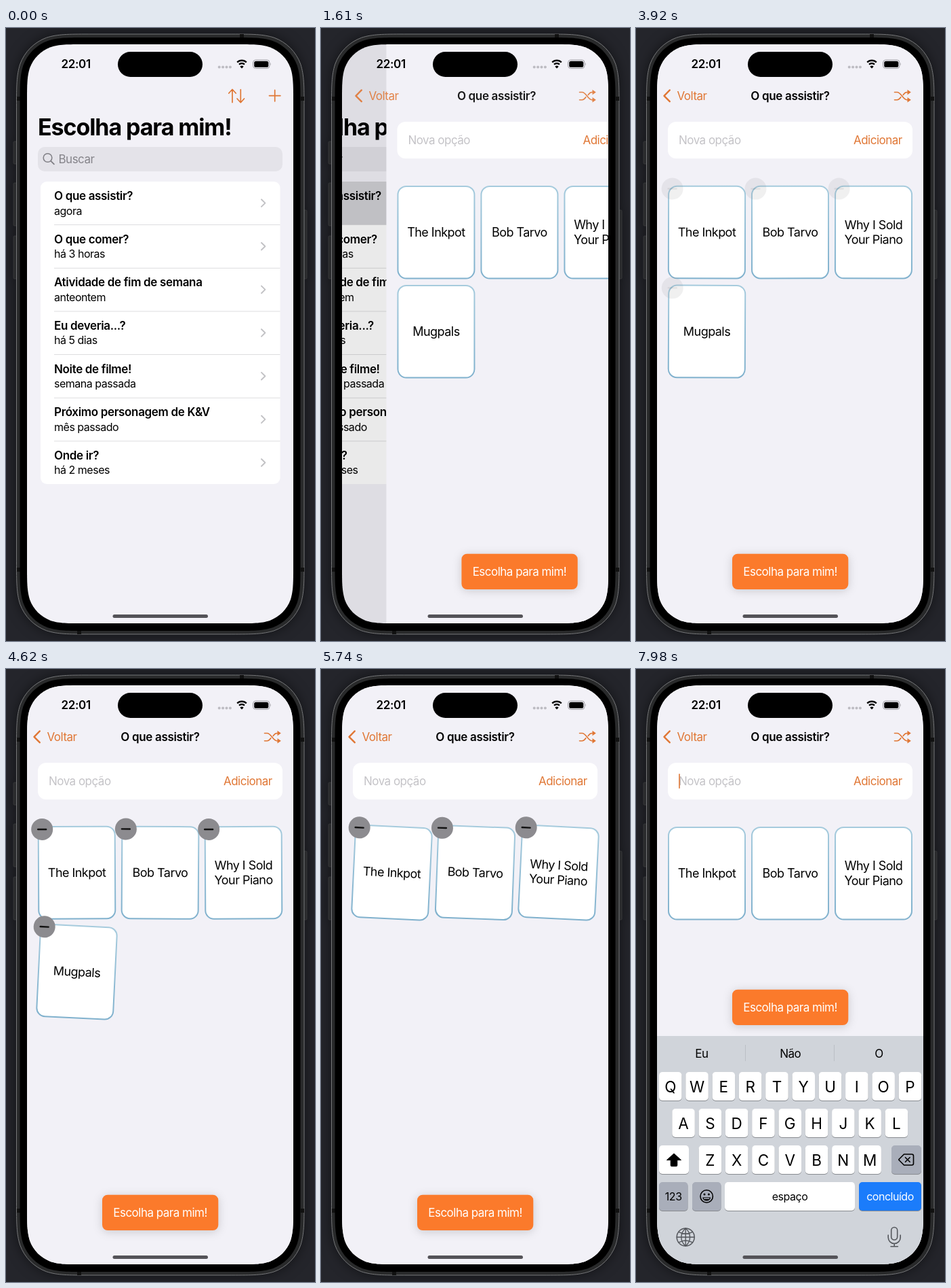
Recreate the animation shown at these times as an HTML page. Size 456 by 902 pixels, loop 8000 ms.

```html
<!DOCTYPE html>
<html lang="pt">
<head>
<meta charset="utf-8">
<title>Escolha para mim!</title>
<style>
html, body { margin: 0; width: 100%; height: 100%; overflow: hidden; background: #24252b; }
svg { display: block; width: 456px; height: 902px; }
text { font-family: Inter, "Liberation Sans", sans-serif; font-size: 17px; letter-spacing: -.03em; }
.semi { font-weight: 600; letter-spacing: -.02em; }
.sub { font-size: 16px; }
.big { font-size: 34px; font-weight: 700; letter-spacing: -.032em; }
.opt { font-size: 18px; }
.key { font-size: 22.5px; letter-spacing: 0; }
.mid { text-anchor: middle; }
.line { fill: none; stroke-linecap: round; stroke-linejoin: round; }
.tint { stroke: #e07735; }
.tinted { fill: #e07735; }
#pick { filter: drop-shadow(0 2px 7px rgba(0,0,0,.16)); }
#body { filter: drop-shadow(0 0 9px rgba(0,0,0,.5)); }
</style>
</head>
<body>
<svg viewBox="0 0 456 902">
  <defs>
    <clipPath id="screen"></clipPath>
    <linearGradient id="edge" x1="0" y1="0" x2="0" y2="1">
      <stop offset="0" stop-color="#a6cbdd"/><stop offset="1" stop-color="#80b1cd"/>
    </linearGradient>
  </defs>
  <rect width="456" height="902" fill="#24252b"/>
  <g id="body"></g>
  <g clip-path="url(#screen)">
    <rect x="31" y="24" width="393" height="852" fill="#f2f1f7"/>
    <g id="list"></g>
    <rect id="dim" x="31" y="24" width="393" height="852" opacity="0"/>
    <g id="detail"></g>
    <g id="listNav"></g>
    <g id="detailNav"></g>
    <g id="keyboard"></g>
    <g id="status"></g>
  </g>
</svg>
<script>
const LOOP = 8000, STEP = 70, TINT = '#e07735';
const $ = id => document.getElementById(id);
const fill = (id, ...parts) => { $(id).innerHTML = parts.flat().join(''); };
const text = (x, y, str, cls = '', color = '#000') =>
  `<text x="${x}" y="${y}" class="${cls}" fill="${color}">${str.replace('&', '&amp;')}</text>`;
const rect = (x, y, w, h, r, color, extra = '') =>
  `<rect x="${x}" y="${y}" width="${w}" height="${h}" rx="${r}" fill="${color}" ${extra}/>`;
const line = (d, w, color = '', extra = '') =>
  `<path d="${d}" class="line ${color ? '' : 'tint'}" stroke-width="${w}" ${color && `stroke="${color}"`} ${extra}/>`;
const ring = (x, y, r, w, color) =>
  `<circle cx="${x}" cy="${y}" r="${r}" fill="none" stroke="${color}" stroke-width="${w}"/>`;

// Rectangle whose corners bend gradually, mirrored into all four corners
const BEND = [[0, 1.53], [0, 1.09], [0, .868], [.075, .631], [.169, .373],
  [.373, .169], [.631, .075], [.868, 0], [1.09, 0], [1.53, 0]];
function smoothRect(x, y, w, h, r, color, extra = '') {
  const corner = (right, bottom) => {
    const pts = BEND.map(([a, b]) => [right ? x + w - a * r : x + a * r, bottom ? y + h - b * r : y + b * r]);
    const [first, ...rest] = right === bottom ? pts : pts.reverse();
    return `${first} C${rest.join(' ')}`;
  };
  const d = 'M' + [corner(0, 0), corner(1, 0), corner(1, 1), corner(0, 1)].join(' L') + 'Z';
  return `<path d="${d}" fill="${color}" ${extra}/>`;
}

// Phone shell
const sideButton = (x, y, h) => rect(x, y, 6, h, 1.5, '#292a2c', 'stroke="#3d3e41" stroke-width=".8"');
fill('screen', smoothRect(31, 24, 393, 852, 55, '#000'));
fill('body',
  sideButton(11, 167, 33), sideButton(11, 228, 63), sideButton(11, 306, 63), sideButton(438, 268, 101),
  smoothRect(15.5, 9, 424.5, 883, 70, '#292a2b', 'stroke="#77787a" stroke-width="1"'),
  rect(16, 101, 5, 6, 0, '#111'), rect(435, 101, 5, 6, 0, '#111'),
  rect(16, 794, 5, 6, 0, '#111'), rect(435, 794, 5, 6, 0, '#111'),
  rect(345, 9, 6, 5, 0, '#111'), rect(105, 887, 6, 5, 0, '#111'),
  smoothRect(20.5, 14, 414, 873, 65, '#000'));

// Status bar, island and home bar
fill('status',
  text(81.5, 59, '22:01', 'semi'),
  rect(165, 35, 125, 37, 18.5, '#000'),
  [0, 1, 2, 3].map(i => `<circle cx="${314.7 + i * 5.4}" cy="57.5" r="2" fill="#bdbcc2"/>`),
  line('M341.2 50.5a9.6 9.6 0 0 1 13.6 0M344 53.7a5.7 5.7 0 0 1 8 0', 2.4, '#000', 'style="stroke-linecap:butt"'),
  '<path d="M348 59.6l-2.7-2.9a3.9 3.9 0 0 1 5.4 0z"/>',
  rect(364.5, 47, 24.5, 12.5, 4, 'none', 'stroke="#9f9ea4"'),
  rect(366.2, 48.7, 21.1, 9.1, 2.6, '#000'),
  '<path d="M390.4 51.2q1.7 2-.1 4z" fill="#9f9ea4"/>',
  rect(157.5, 863, 140.5, 5, 2.5, '#545358'));

// List page
const ROWS = [
  ['O que assistir?', 'agora'], ['O que comer?', 'há 3 horas'],
  ['Atividade de fim de semana', 'anteontem'], ['Eu deveria...?', 'há 5 dias'],
  ['Noite de filme!', 'semana passada'], ['Próximo personagem de K&V', 'mês passado'],
  ['Onde ir?', 'há 2 meses']
];
const ROW = 63.65;
fill('list',
  text(47, 158, 'Escolha para mim!', 'big'),
  rect(47, 175, 361, 36, 10, '#e4e3e9'),
  ring(61.5, 191, 6.3, 1.6, '#818086'), line('M66.3 195.8l4.6 4.6', 1.8, '#818086'),
  text(77.5, 199, 'Buscar', '', '#85848a'),
  rect(51, 226, 353.5, 445, 9, '#fff'),
  '<path id="tap" d="M51 289.5V235q0-9 9-9h335.5q9 0 9 9v54.5z" fill="#d1d1d6" opacity="0"/>',
  ROWS.map(([title, when], i) => {
    const y = 226 + i * ROW;
    return text(71, y + 27, title, 'semi') + text(71, y + 48.5, when, 'sub') +
      line(`M377 ${y + 26.3}l5.4 5.3l-5.4 5.3`, 1.9, '#c2c2c5') +
      (i ? rect(71, y - .4, 333.5, .8, 0, '#d5d5d8') : '');
  }));
fill('listNav',
  line('M334 109.5V90.5M328.8 96l5.2-5.7l5.2 5.7M346.3 90.5v19M341.1 104l5.2 5.7l5.2-5.7', 1.7),
  line('M388.5 99.6h16.4M396.7 91.4v16.4', 1.7));

// Detail page
const CARDS = [
  { x: 104.5, y: 300.7, label: ['The Inkpot'], phase: -.02 },
  { x: 227.5, y: 300.7, label: ['Bob Tarvo'], phase: .15 },
  { x: 350.5, y: 300.7, label: ['Why I Sold', 'Your Piano'], phase: 0 },
  { x: 104.5, y: 446.7, label: ['Mugpals'], phase: .5 }
];
fill('detail',
  rect(31, 24, 393, 852, 0, '#f2f1f7'),
  rect(47, 138, 361, 54, 12, '#fff'),
  text(63, 171, 'Nova opção', '', '#c4c3c7'),
  text(321, 171, 'Adicionar', '', TINT),
  rect(63, 154, 2, 22, 1, TINT, 'id="caret"'),
  CARDS.map(({ label }) => '<g class="card">' +
    rect(-56.5, -67.8, 113, 135.6, 12.5, '#fff', 'stroke="url(#edge)" stroke-width="2"') +
    label.map((s, i) => text(0, 6.2 + (i * 2 - label.length + 1) * 10.8, s, 'opt mid')).join('') +
    '<g class="badge" transform="translate(-51 -64)"><circle r="16" fill="#8c8b8f"/>' +
    line('M-6 0H6', 2.4, '#111') + '</g></g>'),
  '<g id="pick">', rect(142, 773.7, 171.3, 52.3, 8, '#fb7a2b'),
  text(227.5, 806, 'Escolha para mim!', 'mid', '#fff'), '</g>');
fill('detailNav',
  '<g id="goBack">', line('M49.8 91.4l-8.3 8.4l8.3 8.4', 2.4),
  text(60.5, 106, 'Voltar', '', TINT), '</g>',
  `<g id="title">${text(227.5, 106, 'O que assistir?', 'semi mid')}</g>`,
  line('M381.5 94.5h3.8c6 0 8.5 11.2 14.5 11.2h4M381.5 105.7h3.8c2.3 0 4-1.8 5.5-4M394.2 98.5c1.5-2.3 3.3-4 5.6-4h4', 1.6),
  '<path class="tinted" d="M400.5 90.8l5.3 3.7l-5.3 3.7zM400.5 102l5.3 3.7l-5.3 3.7z"/>');

// Keyboard
const PITCH = 39.3, WHITE = '#fff', GRAY = '#a9aeba';
const keycap = (x, y, w, color) => rect(x, y + 1, w, 42, 5, '#888b90') + rect(x, y, w, 42, 5, color);
const keyRow = (letters, x, y) => [...letters].map((c, i) =>
  keycap(x + i * PITCH, y, 33.5, WHITE) + text(x + i * PITCH + 16.75, y + 29.5, c, 'key mid'));
fill('keyboard',
  rect(31, 540, 393, 336, 0, '#d0d4da'),
  rect(161, 553, 1, 24, 0, '#bbbfc5'), rect(292, 553, 1, 24, 0, '#bbbfc5'),
  ['Eu', 'Não', 'O'].map((s, i) => text(97 + i * 130.7, 572, s, 'mid')),
  keyRow('QWERTYUIOP', 34, 593), keyRow('ASDFGHJKL', 53.3, 647), keyRow('ZXCVBNM', 92.6, 701),
  keycap(34, 701, 44, WHITE),
  '<path d="M56 713l10.5 9.6h-5.7v7.6q0 1.5-1.5 1.5h-6.6q-1.5 0-1.5-1.5v-7.6h-5.7z" stroke="#000" stroke-linejoin="round"/>',
  keycap(377, 701, 44, GRAY),
  line('M395.5 714h11.5q2.5 0 2.5 2.5v11q0 2.5-2.5 2.5h-11.5l-7.2-7.2q-.9-.8 0-1.6zM397.5 718.7l6.6 6.6M404.1 718.7l-6.6 6.6', 1.6, '#000'),
  keycap(34, 755, 42.5, GRAY), text(55.2, 782, '123', 'sub mid'),
  keycap(83, 755, 42.5, GRAY), ring(104.2, 776, 9.2, 1.6, '#000'),
  '<circle cx="101" cy="773" r="1.5"/><circle cx="107.4" cy="773" r="1.5"/>',
  '<path d="M98.2 777.5h12q-.8 5-6 5t-6-5z"/>',
  rect(100, 778.6, 8.4, 1.4, .5, GRAY),
  keycap(131, 755, 192, WHITE), text(227, 781.5, 'espaço', 'sub mid'),
  keycap(329, 755, 92, '#1b7cfb'), text(375, 781.5, 'concluído', 'sub mid', '#fff'),
  ring(73.2, 836, 13, 1.5, '#54575c'),
  line('M73.2 823v26M60.2 836h26M63.5 828.5q9.7 5 19.4 0M63.5 843.5q9.7-5 19.4 0M73.2 823c-8.5 7-8.5 19 0 26c8.5-7 8.5-19 0-26', 1.4, '#54575c'),
  rect(376.7, 821.5, 9, 18.5, 4.5, 'none', 'stroke="#54575c" stroke-width="1.6"'),
  line('M372.2 833v3.5a9 9 0 0 0 18 0V833M381.2 845.5v4.3M376 849.8h10.4', 1.6, '#54575c'));

// Motion
const ramp = (t, a, b) => Math.min(1, Math.max(0, (t - a) / (b - a)));
const ease = (t, a, b) => { const p = ramp(t, a, b); return p * p * (3 - 2 * p); };
const spring = (t, start, speed) => {
  const x = Math.max(0, t - start) / 1000 * speed;
  return 1 - Math.exp(-x) * (1 + x);
};
const move = (el, x, y, rest = '') => el.setAttribute('transform', `translate(${x} ${y})${rest}`);
const fade = (el, a) => el.setAttribute('opacity', a);
const cards = [...document.querySelectorAll('.card')];
const badges = [...document.querySelectorAll('.badge')];

function draw(t) {
  const push = t >= 1960 ? 1 : spring(t, 1370, 13.5);
  fade($('tap'), t >= 1400 ? 1 : 0);
  move($('list'), -118 * push, 0);
  fade($('dim'), .1 * push);
  move($('detail'), 394 * (1 - push), 0);
  fade($('listNav'), 1 - ramp(push, 0, .5));
  fade($('detailNav'), ramp(push, .25, .9));
  move($('goBack'), 60 * (1 - push), 0);
  move($('title'), 190 * (1 - push), 0);

  const editing = ease(t, 3880, 4060) * (1 - ease(t, 6130, 6400));
  cards.forEach((el, i) => {
    const { x, y, phase } = CARDS[i];
    const turn = ((t - 4620) / 320 + phase) * 2 * Math.PI;
    const angle = editing * (1.25 - 1.55 * Math.cos(turn));
    const gone = i === 3 ? ease(t, 5150, 5430) : 0;
    move(el, x, y - editing, ` rotate(${angle}) scale(${1 - .3 * gone})`);
    fade(el, 1 - gone);
    fade(badges[i], editing);
  });

  move($('keyboard'), 0, 336 * (1 - spring(t, 6880, 12.74)));
  move($('pick'), 0, -302 * spring(t, 6880, 15.75));
  fade($('caret'), t < 6860 ? 0 : 1 - ramp(t, 7530, 7700) + .8 * ramp(t, 7840, 7980));
}

function tick() {
  const t = performance.now() % LOOP;
  draw(Math.floor(t / STEP) * STEP);
  requestAnimationFrame(tick);
}
tick();
</script>
</body>
</html>
```
